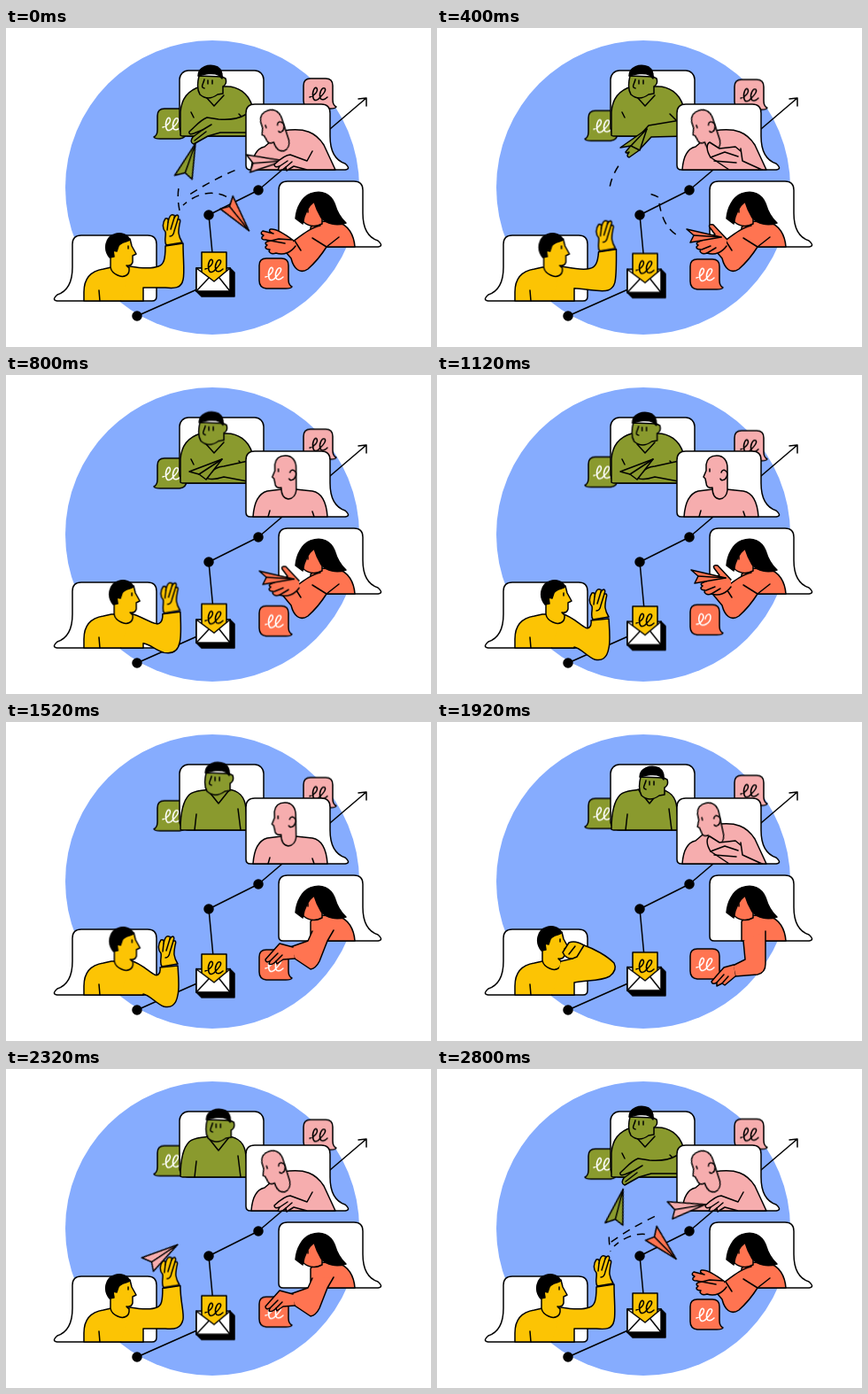
Write an HTML page without scripts that moves like this. It is 480 px wide and 360 px high and loops after 2.88 s.

```html
<!DOCTYPE html>
<html lang="en">
<head>
<meta charset="utf-8">
<title>Paper plane messages</title>
<style>
html, body { margin: 0; height: 100%; overflow: hidden; background: #fff; }
svg { display: block; width: 100vw; height: 100vh; }
svg { stroke: #000; stroke-width: 1.5; stroke-linejoin: round; stroke-linecap: round; fill: none; }
.yellow { fill: #fcc404; }
.green { fill: #8a9a2e; }
.pink { fill: #f6adae; }
.orange { fill: #ff7451; }
.white { fill: #fff; }
.ink { fill: #000; }
.line { fill: none; }
.light { stroke: #fff; fill: none; }

/* Poses switch hard, movement is continuous */
.pose { animation: 2.88s steps(1) infinite; }
.move { animation: 2.88s linear infinite; }

/* Floating notes and envelope */
.bob-green { animation-name: bob-green; }
.bob-pink { animation-name: bob-pink; }
.bob-orange { animation-name: bob-orange; }
.bob-card { animation-name: bob-card; }
.bob-envelope { animation-name: bob-envelope; }
@keyframes bob-green {
  0%, 100% { transform: none; animation-timing-function: ease-out }
  24% { transform: translateY(3px); animation-timing-function: ease-in-out }
  73% { transform: translateY(-5px); animation-timing-function: ease-in }
}
@keyframes bob-pink {
  0%, 100% { transform: none; animation-timing-function: ease-in-out }
  45% { transform: translateY(6px); animation-timing-function: ease-in-out }
  95% { transform: translateY(-1px) }
}
@keyframes bob-orange {
  0%, 100% { transform: none; animation-timing-function: ease-out }
  18% { transform: translateY(1px); animation-timing-function: ease-in-out }
  69% { transform: translateY(-4px); animation-timing-function: ease-in-out }
}
@keyframes bob-card {
  0%, 100% { transform: translateY(-2px); animation-timing-function: ease-in-out }
  50% { transform: translateY(7px); animation-timing-function: ease-in-out }
}
@keyframes bob-envelope {
  0%, 100% { transform: translateY(-5px); animation-timing-function: ease-in-out }
  48% { transform: translateY(3px); animation-timing-function: ease-in-out }
}

.y-arm { animation-name: y-arm-show; }
.y-chin { animation-name: y-chin-show; }
@keyframes y-arm-show { 0%, 72%, 100% { visibility: visible } 57% { visibility: hidden } }
@keyframes y-chin-show { 0%, 72%, 100% { visibility: hidden } 57% { visibility: visible } }
.y-head { animation-name: y-head; }
@keyframes y-head {
  0%, 75%, 100% { transform: none }
  16.7% { transform: translate(3px, 0) }
  36%, 50% { transform: translate(5px, 0) }
  66.7% { transform: translate(1px, -1px) }
}
.y-hand { animation-name: y-hand; }
@keyframes y-hand {
  0%, 90%, 100% { transform: none }
  16.7% { transform: translate(3px, 8px) }
  33%, 57% { transform: translate(-5px, 31px) }
  72%, 78% { transform: translate(-4px, 2px) }
}
.y-sleeve { animation-name: y-sleeve; }
@keyframes y-sleeve {
  0%, 90%, 100% { d: path("M140 269C152 271 164 272 172 269C178 267 180 262 180 246L200 243C200 262 202 276 200 284C198 294 190 294 180 293C172 293 160 293 155 293V308H130") }
  16.7% { d: path("M140 269C152 271 164 274 172 272C179 271 182 266 183 254L203 251C203 267 203 280 201 288C198 298 190 298 180 297C172 296 160 294 155 294V308H130") }
  33%, 57% { d: path("M140 269C152 272 162 282 166 284C171 288 175 284 174 277L194 275C195 290 196 300 194 308C192 320 186 323 178 321C170 318 162 308 155 307V308H130") }
  72%, 78% { d: path("M140 269C152 271 164 272 170 269C175 267 176 262 176 248L196 245C196 262 201 274 200 282C198 293 190 294 180 293C172 293 160 293 155 293V308H130") }
}

.g-rest { animation-name: g-rest; }
.g-catch { animation-name: g-catch; }
.g-hold { animation-name: g-hold; }
.g-lean { animation-name: g-lean; }
.g-plain { animation-name: g-plain; }
@keyframes g-rest { 0%, 88%, 100% { visibility: visible } 8% { visibility: hidden } }
@keyframes g-catch { 0%, 25%, 100% { visibility: hidden } 8% { visibility: visible } }
@keyframes g-hold { 0%, 42%, 100% { visibility: hidden } 25% { visibility: visible } }
@keyframes g-lean { 0%, 88%, 100% { visibility: visible } 42% { visibility: hidden } }
@keyframes g-plain { 0%, 88%, 100% { visibility: hidden } 42% { visibility: visible } }
.g-head { animation-name: g-head; }
@keyframes g-head {
  0%, 18%, 90%, 100% { transform: translate(-7px, -2px) }
  36% { transform: translate(-5px, -3px) }
  45%, 49% { transform: none }
  66.7% { transform: translate(5px, 6px) }
  77.8% { transform: translate(5px, 2px) }
}

.p-rest { animation-name: p-rest; }
.p-chin { animation-name: p-chin; }
.p-lean { animation-name: p-lean; }
.p-plain { animation-name: p-plain; }
@keyframes p-rest { 0%, 72%, 100% { visibility: visible } 8% { visibility: hidden } }
@keyframes p-chin { 0%, 27%, 72%, 100% { visibility: hidden } 8%, 58% { visibility: visible } }
@keyframes p-lean { 0%, 58%, 100% { visibility: visible } 27% { visibility: hidden } }
@keyframes p-plain { 0%, 58%, 100% { visibility: hidden } 27% { visibility: visible } }
.p-head { animation-name: p-head; transform-origin: 318px 140px; }
@keyframes p-head {
  0%, 20%, 97%, 100% { transform: translate(-5px, -1px) rotate(-18deg) }
  28%, 52% { transform: none }
  62%, 69% { transform: translate(-2px, -1px) rotate(-12deg) }
  77.8% { transform: translate(-4px, -1px) rotate(-17deg) }
}

.o-open { animation-name: o-open; }
.o-arms { animation-name: o-arms; }
.o-hold { animation-name: o-hold; }
.o-touch { animation-name: o-touch; }
.o-low { animation-name: o-low; }
@keyframes o-arms { 0%, 88%, 100% { visibility: visible } 42% { visibility: hidden } }
@keyframes o-open { 0%, 88%, 100% { visibility: visible } 10% { visibility: hidden } }
@keyframes o-hold { 0%, 42%, 100% { visibility: hidden } 10% { visibility: visible } }
@keyframes o-touch { 0%, 57%, 88%, 100% { visibility: hidden } 42%, 72% { visibility: visible } }
@keyframes o-low { 0%, 72%, 100% { visibility: hidden } 57% { visibility: visible } }
.o-lift { animation-name: o-lift; }
@keyframes o-lift { 0%, 18%, 100% { transform: none } 30%, 45% { transform: translate(5px, -7px) } }
.o-note { animation-name: o-note; }
.o-heart { animation-name: o-heart; }
@keyframes o-note { 0%, 42%, 100% { visibility: visible } 30% { visibility: hidden } }
@keyframes o-heart { 0%, 42%, 100% { visibility: hidden } 30% { visibility: visible } }

.fly-green { animation-name: fly-green; }
@keyframes fly-green {
  0%, 100% { transform: translate(206px, 151px) rotate(-69deg); opacity: 1 }
  8% { transform: translate(215px, 138px) rotate(-50deg); opacity: 1 }
  8.1%, 87.9% { transform: translate(193px, 198px) rotate(-85deg); opacity: 0 }
  88% { transform: translate(193px, 198px) rotate(-85deg); opacity: 1 }
  97.2% { transform: translate(204px, 157px) rotate(-74deg); opacity: 1 }
}
.fly-orange { animation-name: fly-orange; }
@keyframes fly-orange {
  0%, 100% { transform: translate(261px, 211px) rotate(53deg); opacity: 1 }
  10% { transform: translate(286px, 235px) rotate(35deg); opacity: 1 }
  10.1%, 87.9% { transform: translate(203px, 198px) rotate(-30deg); opacity: 0 }
  88% { transform: translate(203px, 198px) rotate(-30deg); opacity: 1 }
  93% { transform: translate(232px, 187px) rotate(10deg); opacity: 1 }
  97.2% { transform: translate(255px, 198px) rotate(47deg); opacity: 1 }
}
.fly-pink { animation-name: fly-pink; }
@keyframes fly-pink {
  0%, 100% { transform: translate(292px, 151px) rotate(-3deg); opacity: 1 }
  8% { transform: translate(297px, 149px); opacity: 1 }
  8.1%, 71.9% { transform: translate(172px, 218px) rotate(-32deg); opacity: 0 }
  72% { transform: translate(172px, 218px) rotate(-32deg); opacity: 1 }
  77.8%, 82% { transform: translate(175px, 210px) rotate(-32deg); opacity: 1 }
  97.2% { transform: translate(281px, 156px) rotate(-8deg); opacity: 1 }
}

.trail { stroke-linecap: butt; }
.trail-green { animation-name: trail-green; stroke-dasharray: 9 7 9 400; }
.trail-orange { animation-name: trail-orange; stroke-dasharray: 9 7 9 7 9 7 9 400; }
.trail-pink { animation-name: trail-pink; stroke-dasharray: 9 7 9 7 9 7 9 400; }
@keyframes trail-green {
  0%, 100% { stroke-dashoffset: 0; opacity: 1 }
  16.7% { stroke-dashoffset: -33; opacity: 1 }
  20% { stroke-dashoffset: -42; opacity: 1 }
  20.1%, 90% { stroke-dashoffset: 30; opacity: 0 }
  90.1% { stroke-dashoffset: 30; opacity: 1 }
}
@keyframes trail-orange {
  0%, 100% { stroke-dashoffset: 4; opacity: 1 }
  16.7% { stroke-dashoffset: -55; opacity: 1 }
  20% { stroke-dashoffset: -67; opacity: 1 }
  20.1%, 90% { stroke-dashoffset: 57; opacity: 0 }
  90.1% { stroke-dashoffset: 57; opacity: 1 }
}
@keyframes trail-pink {
  0%, 100% { stroke-dashoffset: -22; opacity: 1 }
  12% { stroke-dashoffset: -88; opacity: 1 }
  12.1%, 84% { stroke-dashoffset: 57; opacity: 0 }
  84.1% { stroke-dashoffset: 57; opacity: 1 }
  97.2% { stroke-dashoffset: -8; opacity: 1 }
}
</style>
</head>
<body>
<svg viewBox="0 0 480 360">
  <defs>
    <path id="bubble" d="M281 86H356Q366 86 366 96V122C366 138 371 149 383 153Q391 160 381 160H276Q271 160 271 155V96Q271 86 281 86Z"/>
    <path id="tag" d="M8 0H25Q33 0 33 8V24Q33 30 37 32Q36 34 30 34H8Q0 33 0 25V8Q0 0 8 0Z"/>
    <path id="note" d="M0 11C5 10 10 4 8 1C6-2 2 5 4 12C5 16 9 15 12 11C16 7 19 3 17 1C14-1 10 7 12 12C13 15 17 14 20 11"/>
    <g id="plane">
      <path d="M22 0L-20-9L-13 1L-17 11Z"/>
      <path class="line" d="M22 0L-13 1"/>
    </g>
    <path id="open-hand" d="M325 240C317 234 306 226 299 227C296 228 298 231 302 232L290 229Q286 232 291 234L289 236Q288 239 293 239L315 243M323 239L308 238L295 241Q291 243 295 245L293 247Q293 250 298 250L297 252Q299 256 305 254C314 257 322 253 327 246"/>
  </defs>

  <circle cx="233" cy="180" r="166" fill="#86acfe" stroke="none"/>
  <path d="M148 325L236 286L229 211L285 183L407 79M398 80L407 79V88"/>
  <g class="ink">
    <circle cx="148" cy="325" r="5"/>
    <circle cx="229" cy="211" r="5"/>
    <circle cx="285" cy="183" r="5"/>
  </g>

  <!-- Envelope -->
  <g class="move bob-envelope">
    <path class="ink" d="M215 276H253L258 281V308H221L215 302Z"/>
    <path class="white" d="M215 276H253V302H215Z"/>
  </g>
  <g class="move bob-card">
    <path class="yellow" d="M221 255H249V279L235 290L221 279Z"/>
    <use href="#note" x="225" y="263"/>
  </g>
  <g class="move bob-envelope">
    <path class="white" d="M215 276L235 291L253 276V302H215Z"/>
    <path d="M215 302L229 287M253 302L241 287"/>
  </g>

  <!-- Message tags -->
  <g class="move bob-green">
    <use href="#tag" class="green" transform="matrix(-1 0 0 1 204 91)"/>
    <use href="#note" class="light" x="177" y="101"/>
  </g>
  <g class="move bob-pink">
    <use href="#tag" class="pink" x="336" y="57"/>
    <use href="#note" x="343" y="67"/>
  </g>
  <g class="move bob-orange">
    <use href="#tag" class="orange" x="286" y="260"/>
    <use href="#note" class="light pose o-note" x="293" y="270"/>
    <path class="light pose o-heart" d="M293 282C298 282 303 274 300 271C297 268 294 275 297 281C299 286 309 281 309 274C309 269 304 270 303 276"/>
  </g>

  <!-- Green friend -->
  <rect class="white" x="196" y="48" width="95" height="74" rx="10"/>
  <g class="green">
    <g class="pose g-lean">
      <path d="M197 121V95C198 80 206 70 220 66H247C262 65 274 74 278 88L281 122H202Q197 122 197 121Z"/>
      <path class="line" d="M226 78L235 88L246 76M263 97L270 104M212 101L209 95"/>
    </g>
    <g class="pose g-plain">
      <path d="M197 121C197 104 199 90 207 82C213 77 221 78 228 76H251C262 77 270 84 271 98L273 122H202Q197 122 197 121Z"/>
      <path class="line" d="M213 122L215 104M228 77L240 92L252 77M262 98L265 122"/>
    </g>
    <g class="move g-head">
      <path d="M225 56C223 64 223 72 226 77Q235 85 246 77L252 76V68Q257 65 255 59L251 57Z"/>
      <path class="ink" d="M224 56C224 46 236 42 246 46Q252 50 251 59L247 55C240 52 232 54 224 56Z"/>
      <path class="line" d="M231 60C230 65 226 69 231 70M235 61V65M240 61V65"/>
    </g>
    <g class="pose g-rest">
      <path d="M272 97C262 103 250 104 240 103L227 101C219 104 214 111 207 117Q206 121 212 119L222 115L211 123Q207 129 212 131L228 122L242 118H272"/>
      <path class="line" d="M222 115L232 109M213 127L226 117"/>
    </g>
    <g class="pose g-catch">
      <path d="M281 103L239 110L221 130L213 140Q213 142 217 140Q213 145 217 146L227 139L242 123L281 122"/>
      <path d="M207 135L237 114L229 138L219 133Z"/>
      <path class="line" d="M237 114L219 133"/>
    </g>
    <g class="pose g-hold">
      <path d="M278 96L246 103Q236 104 232 110L225 115Q230 120 246 115L278 121"/>
      <path d="M207 109L244 95L226 118L218 112Z"/>
      <path class="line" d="M244 95L218 112"/>
    </g>
  </g>

  <!-- Pink friend -->
  <use href="#bubble" class="white"/>
  <g class="pink">
    <g class="pose p-plain">
      <path d="M279 160C280 146 284 134 295 131L311 129H327L346 131C357 133 362 145 363 160Z"/>
      <path class="line" d="M296 160L298 153M348 160L346 154"/>
    </g>
    <path class="pose p-lean" d="M277 160C278 147 282 136 292 134L313 116C338 112 350 118 359 132L372 160Z"/>
    <g class="move p-head">
      <path d="M304 101C305 94 310 91 316 91C324 91 328 97 328 105V130Q327 139 319 140Q311 139 311 127C307 128 304 126 304 122L303 117L301 115L304 108Z"/>
      <path class="line" d="M321 110C323 104 330 109 327 115C325 120 320 119 320 117M308 106V109"/>
    </g>
    <g class="pose p-chin">
      <path d="M343 136L345 150L367 160H330L309 146C304 138 304 131 308 129L319 136L337 134L343 139"/>
      <path class="line" d="M309 146L325 140L340 145M313 150L338 152"/>
    </g>
  </g>

  <!-- Orange friend -->
  <use href="#bubble" class="white" x="37" y="87"/>
  <g class="orange">
    <path d="M344 247V225L352 218L374 219C387 222 393 234 394 247Z"/>
    <path d="M341 194C334 203 333 212 336 219Q346 227 357 221V196Z"/>
    <path class="ink" d="M344 187C357 182 367 188 371 198C374 208 378 215 384 220C373 224 362 221 356 214C353 209 350 203 348 196C340 202 337 210 335 221L327 215C328 203 334 191 344 187Z"/>
    <path class="line" d="M341 205V208"/>
    <g class="pose o-arms">
      <path d="M355 223C345 225 335 233 324 241L312 248L322 260C325 272 332 278 341 272C350 264 357 255 362 247L376 236"/>
      <path class="line" d="M346 237L362 247M326 240L333 251"/>
    </g>
    <use href="#open-hand" class="pose o-open"/>
    <g class="pose o-hold">
      <g class="move o-lift">
        <path d="M327 238L312 222Q306 221 308 225L314 233L296 241Q291 243 295 245L293 247Q293 250 298 250L297 252Q299 256 305 254C314 257 322 253 327 246"/>
        <path d="M282 227L321 236L286 242L290 234Z"/>
        <path class="line" d="M290 234L321 236"/>
        <path class="line" d="M299 250L309 246M305 254L315 248"/>
      </g>
    </g>
    <g class="pose o-touch">
      <path d="M346 236L341 247L321 254L326 267L344 279Q350 278 354 270L363 247L370 235"/>
      <path d="M324 254L309 250L301 259L293 268Q293 272 298 270L297 273Q300 275 305 270L306 273L313 268L326 267"/>
      <path class="line" d="M298 270L307 261M305 270L312 263"/>
    </g>
    <g class="pose o-low">
      <path d="M346 247L348 268L334 275L337 287L362 285Q371 283 371 273V236"/>
      <path d="M335 274L324 277L316 286L310 293Q311 297 316 294L316 298L322 295L325 297L337 287"/>
      <path class="line" d="M316 294L324 285M322 295L329 287"/>
    </g>
  </g>

  <!-- Yellow friend -->
  <use href="#bubble" class="white" transform="matrix(-1 0 0 1 441 148)"/>
  <g class="yellow">
    <path d="M155 308H88V298C88 282 97 274 110 272L119 270L141 270"/>
    <path class="line" d="M106 308L105 296"/>
    <g class="pose y-arm">
      <path class="move y-sleeve" d="M140 269C152 271 164 272 172 269C178 267 180 262 180 246L200 243C200 262 202 276 200 284C198 294 190 294 180 293C172 293 160 293 155 293V308H130"/>
      <g class="move y-hand">
        <path d="M181 245C178 240 181 235 180 230C176 226 177 219 180 215Q184 214 183 219C184 213 186 210 189 211Q191 211 190 214C193 209 196 211 194 216Q198 215 196 221C195 228 193 232 199 242Z"/>
        <path class="line" d="M183 219L182 228M190 214L186 227M194 216L190 229Q189 235 185 235"/>
      </g>
    </g>
    <g class="move y-head">
      <path d="M118 270V254L127 240L140 238L142 246L147 255L143 257V264Q142 269 136 268L139 271C140 280 132 282 126 279Q119 276 118 270Z"/>
      <path class="ink" d="M117 259C109 249 113 236 122 233C130 230 137 233 140 239C136 242 130 241 127 246L125 252L121 251L122 258Z"/>
      <path class="line" d="M138 246V249"/>
    </g>
    <g class="pose y-chin">
      <path d="M140 270L153 267L166 252C178 256 192 264 200 272Q204 280 195 287C184 293 168 291 155 294V308H130"/>
      <path d="M153 267Q145 267 142 260L149 249Q156 246 166 252L158 265Z"/>
      <path class="line" d="M149 262L156 253"/>
    </g>
  </g>

  <!-- Paper planes -->
  <path class="trail move trail-green" d="M196 206C192 185 193 165 220 137"/>
  <path class="trail move trail-orange" d="M200 200C220 182 240 185 250 191C253 215 260 236 290 240"/>
  <path class="trail move trail-pink" d="M190 200Q225 174 265 158"/>
  <use href="#plane" class="green move fly-green"/>
  <use href="#plane" class="orange move fly-orange"/>
  <use href="#plane" class="pink move fly-pink"/>
  <g class="pink pose p-rest">
    <path d="M346 139L340 150L321 143Q315 143 303 154Q303 158 309 156L307 160Q311 162 316 157L317 161L325 156L340 160H371"/>
    <path class="line" d="M309 156L318 150M316 157L323 151"/>
  </g>
</svg>
</body>
</html>
```
